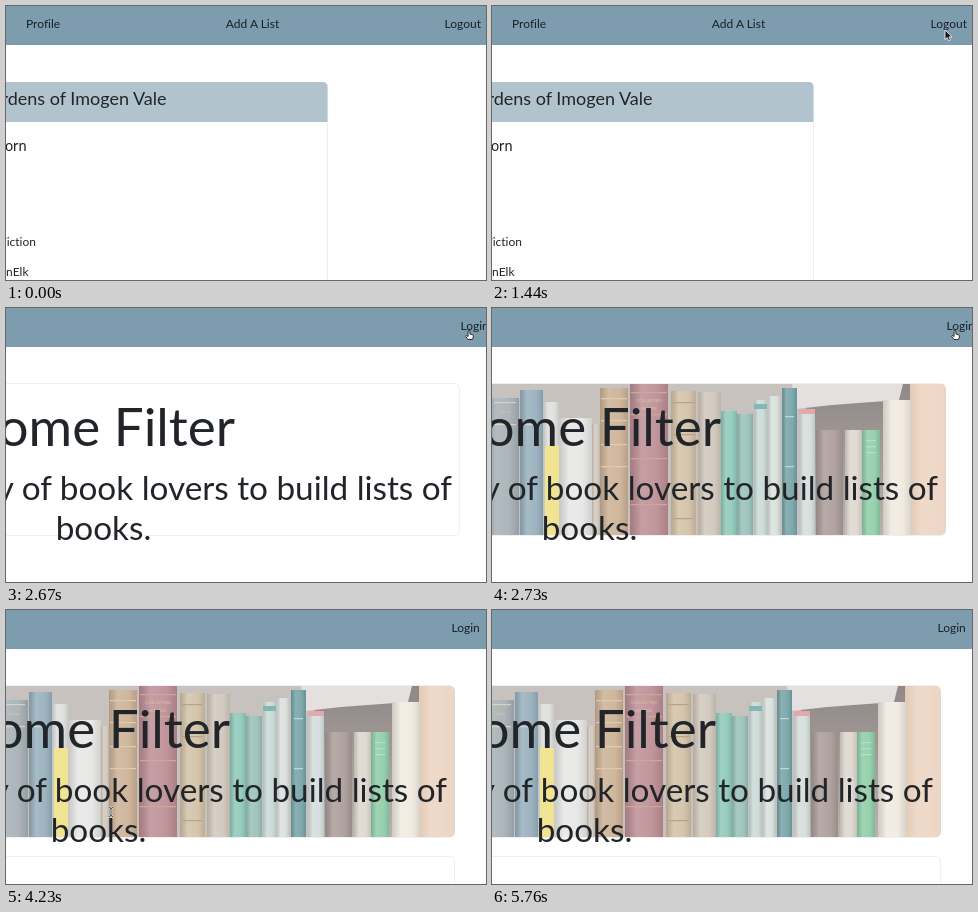
An HTML page for the animation above (6240 ms loop, 480 px wide and 274 px high).

```html
<!DOCTYPE html>
<html lang="en">
<head>
<meta charset="utf-8">
<title>Book lists</title>
<style>
  html, body { margin: 0; width: 100%; height: 100%; overflow: hidden; background: #fff; }
  svg { display: block; width: 100vw; height: 100vh; }
  text { font-family: Lato, "Open Sans", sans-serif; font-variant-ligatures: none; fill: #212529; white-space: pre; }
  .nav text { font-size: 12px; fill: #172127; }
  .end { text-anchor: end; }
  .mid { text-anchor: middle; }
  .title { font-size: 18px; }
  .author { font-size: 14.5px; }
  .small { font-size: 12px; }
  .hero { font-size: 53px; }
  .lead { font-size: 33.3px; }
  .line { fill: none; stroke: #efefef; }
  .spine { font-size: 4.5px; fill: #e0c8a0; text-anchor: middle; }
</style>
</head>
<body>
<svg viewBox="0 0 480 274" preserveAspectRatio="none">
  <defs>
    <clipPath id="frame"><rect x="-20" y="76" width="473.5" height="151" rx="5"/></clipPath>
    <linearGradient id="wood">
      <stop offset="0" stop-color="#e2c9b6"/><stop offset=".3" stop-color="#efdaca"/><stop offset="1" stop-color="#ecd4c3"/>
    </linearGradient>
    <linearGradient id="round">
      <stop offset="0" stop-color="#000" stop-opacity=".13"/><stop offset=".3" stop-color="#fff" stop-opacity=".16"/>
      <stop offset=".7" stop-color="#fff" stop-opacity=".08"/><stop offset="1" stop-color="#000" stop-opacity=".1"/>
    </linearGradient>
    <linearGradient id="shade" x2="0" y2="1">
      <stop offset="0" stop-color="#8f8886"/><stop offset="1" stop-color="#b9b1ad"/>
    </linearGradient>
  </defs>

  <rect width="480" height="39" fill="#7d9dae"/>

  <g id="detail">
    <g class="nav">
      <text x="20" y="21.5">Profile</text>
      <text x="246.5" y="21.5" class="mid">Add A List</text>
      <text x="475" y="21.5" class="end">Logout</text>
    </g>
    <rect class="line" x="-20" y="76.5" width="341.5" height="240" rx="5"/>
    <path d="M-20 76H316.5q5 0 5 5V116H-20Z" fill="#b1c3cd"/>
    <text x="160.5" y="99" class="title end">Gardens of Imogen Vale</text>
    <text x="20.5" y="144.5" class="author end">Lenhorn</text>
    <text x="30" y="239.5" class="small end">Fiction</text>
    <text x="22.5" y="269.5" class="small end">GreenElk</text>
  </g>

  <g id="home">
    <g class="nav"><text id="login" y="21.5">Login</text></g>
    <g id="page">
      <rect class="line" x="-20" y="75.5" width="473.5" height="152" rx="5"/>
      <g id="photo" clip-path="url(#frame)"></g>
      <text x="229" y="138" class="hero end">Tome Filter</text>
      <text x="446" y="191.5" class="lead end">y of book lovers to build lists of</text>
      <text x="97.5" y="231.5" class="lead mid">books.</text>
      <rect id="nextCard" class="line" x="-20" y="246.5" width="473.5" height="60" rx="4"/>
    </g>
  </g>

  <g id="cursor" stroke-linejoin="round">
    <path id="arrow" d="M0 0V9.5L2.2 7.5L3.7 10.8L5.4 10L3.9 6.900H7Z" fill="#111" stroke="#fff" stroke-width=".8"/>
    <path id="hand" d="M-.9.8Q0-.5.9.8V4L4 5Q4.600 5.200 4.300 7L3.500 9.500H-.9L-3.300 6.600Q-3.200 5.100-2 5.700L-.9 6.600Z" fill="#fff" stroke="#222" stroke-width=".9"/>
    <g id="beam" fill="none" stroke="#fff" stroke-width="2.2">
      <path id="beamLine" d="M-2-4.5Q0-4.5 0-3Q0-4.5 2-4.5M0-3V3M-2 4.5Q0 4.5 0 3Q0 4.5 2 4.5"/>
      <path d="M-2-4.5Q0-4.5 0-3Q0-4.5 2-4.5M0-3V3M-2 4.5Q0 4.5 0 3Q0 4.5 2 4.5" stroke="#222" stroke-width=".9"/>
    </g>
  </g>
</svg>
<script>
const LOOP = 6240, STEP = 30;
const HOME = 2640, PHOTO = 2730, SCROLLBAR = 2790;
const $ = id => document.getElementById(id);

function add(tag, attrs, label = '') {
  const el = document.createElementNS('http://www.w3.org/2000/svg', tag);
  for (const key in attrs) el.setAttribute(key, attrs[key]);
  el.textContent = label;
  $('photo').append(el);
}
function block(x, y, width, height, fill) {
  add('rect', { x, y, width, height, fill });
}
function book(x, y, width, color) {
  block(x, y, width, 227 - y, color);
  block(x, y, width, 227 - y, 'url(#round)');
}
function bands(x, width, color, ...rows) {
  for (const y of rows) block(x, y, width, 1.2, color);
}

function drawShelf() {
  block(-20, 76, 480, 151, '#c8c2be');
  block(314, 76, 104, 151, 'url(#shade)');
  add('path', { d: 'M300 76H411L407 92L340 97L304 101Z', fill: '#e3e0df' });
  block(418, 76, 40, 151, 'url(#wood)');

  [[-6, 90, 33, '#a5afb5'], [28, 82, 23, '#95aebb'], [51, 94, 16, '#dedfdc'],
   [67, 110, 33, '#e6e6e4'], [100, 116, 8, '#d0c7bc'], [108, 80, 28, '#cbb094'],
   [138, 76, 38, '#bb8d93'], [179, 83, 25, '#d1c0a5'], [206, 84, 23, '#d0c6ba'],
   [229, 103, 16, '#8dc8b9'], [245, 106, 16, '#98c0b8'], [262, 92, 13, '#c9dad5'],
   [276, 88, 12, '#d9e0dc'], [290, 80, 15, '#73a2a5'], [307, 101, 16, '#d4dddb'],
   [324, 122, 27, '#a99b98'], [353, 122, 17, '#dcd6cd'], [370, 122, 18, '#8dcda7'],
   [391, 92, 28, '#f0eadf']].forEach(spec => book(...spec));

  block(53, 138, 14, 89, '#f0e392');
  block(262, 96, 13, 5, '#85b6b4');
  block(307, 101, 16, 5, '#e1a9a7');
  bands(2, 22, '#d8d2be', 94, 116);
  bands(30, 19, '#cbd4d4', 116);
  bands(139, 36, '#cfa79a', 84, 106, 150, 196);
  bands(109, 26, '#dfcbae', 90, 112, 136, 158);
  bands(181, 21, '#b9a287', 94, 126, 210);
  bands(293, 9, '#c2d8d4', 108, 158);
  bands(374, 10, '#b9decb', 132, 138, 144);
  add('text', { x: 157, y: 94, class: 'spine' }, 'COLLECTED');
  add('text', { x: 157, y: 102, class: 'spine' }, 'ESSAYS');
  add('text', { x: 13, y: 105, class: 'spine' }, 'Verse');
}

// time, x, y of the pointer's hot spot
const path = [
  [510, 484, 165], [690, 471, 130], [900, 471, 130], [1410, 453, 24],
  [1500, 453, 24], [1620, 463, 22], [3240, 463, 22], [3930, 105, 202], [4380, 105, 202]
];

function pointerAt(t) {
  const i = path.findIndex(point => point[0] > t);
  if (i < 1) return null;
  const [t0, x0, y0] = path[i - 1], [t1, x1, y1] = path[i];
  const p = (t - t0) / (t1 - t0), e = p * p * (3 - 2 * p);
  return [x0 + (x1 - x0) * e, y0 + (y1 - y0) * e];
}

function show(id, on) {
  $(id).style.display = on ? '' : 'none';
}

function render(now) {
  const t = Math.floor((now % LOOP) / STEP) * STEP;
  const home = t >= HOME, scrolled = t >= SCROLLBAR;
  show('detail', !home);
  show('home', home);
  show('photo', t >= PHOTO);
  show('nextCard', scrolled);
  $('page').setAttribute('transform', `translate(${scrolled ? -5 : 0})`);
  $('login').setAttribute('x', scrolled ? 445.5 : 454.5);

  const pos = pointerAt(t);
  show('cursor', pos);
  if (pos) {
    const hand = t >= 1530 && pos[1] < 26;
    const beam = t > 3240 && pos[1] > 165;
    show('hand', hand);
    show('beam', beam);
    show('arrow', !hand && !beam);
    $('cursor').setAttribute('transform', `translate(${pos})`);
  }
}

drawShelf();
const start = performance.now();
function tick() {
  render(performance.now() - start);
  requestAnimationFrame(tick);
}
tick();
</script>
</body>
</html>
```
